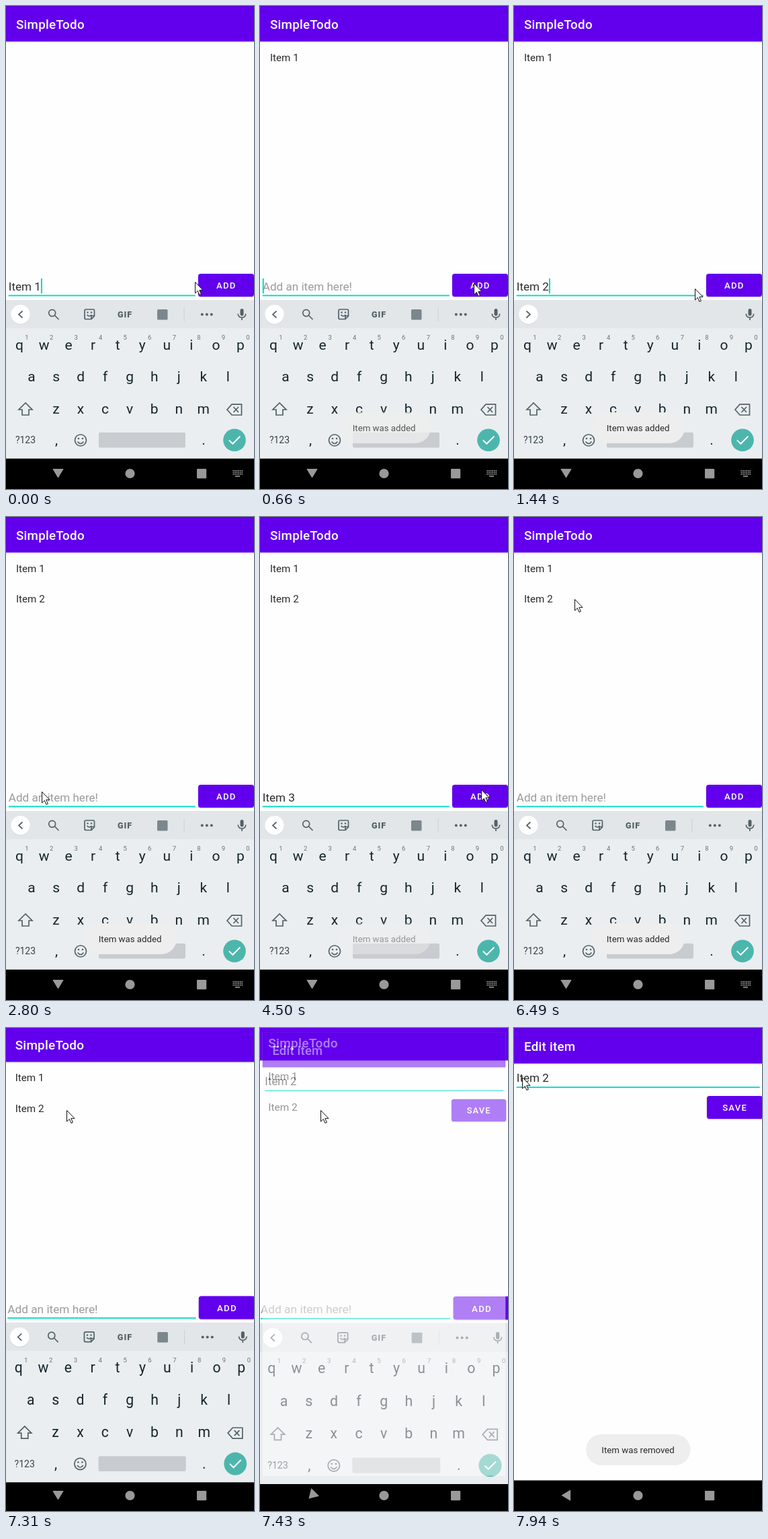
Recreate the animation shown at these times as an HTML page. Size 369x718 px, loop 8000 ms.

```html
<!DOCTYPE html>
<html lang="en">
<head>
<meta charset="utf-8">
<title>Todo list</title>
<style>
  html, body { margin: 0; width: 100%; height: 100%; overflow: hidden; background: #000; }
  svg { display: block; width: 369px; height: 718px; }
  text { font-family: Roboto, "Open Sans", sans-serif; white-space: pre; }
  .title { font-size: 18.8px; font-weight: 500; letter-spacing: .235px; fill: #fff; }
  .item { font-size: 15.15px; fill: #2a2a2a; }
  .field { font-size: 17.1px; fill: #2c2c2c; }
  .button { font-size: 13.15px; font-weight: 500; letter-spacing: 1.18px; fill: #fff; }
  .key { font-size: 21px; fill: #14252d; text-anchor: middle; }
  .digit { font-size: 9.5px; fill: #66737a; text-anchor: middle; }
  .toast { font-size: 13.25px; fill: #2a2a2a; text-anchor: middle; }
  .line { fill: none; stroke: #536168; stroke-width: 1.7; }
</style>
</head>
<body>
<svg id="stage" viewBox="0 0 369 718"></svg>
<script>
const LOOP = 8000;
const PURPLE = '#6200ee', TEAL = '#03dac5', ICON = '#536168', NAV = '#999';

const rect = (x, y, w, h, fill, r = 0) =>
  `<rect x="${x}" y="${y}" width="${w}" height="${h}" rx="${r}" fill="${fill}"/>`;
const label = (cls, x, y, str, extra = '') =>
  `<text class="${cls}" x="${x}" y="${y}" ${extra}>${str}</text>`;
const path = (d, extra = '') => `<path class="line" d="${d}" ${extra}/>`;
const dot = (x, y, r, fill = ICON) => `<circle cx="${x}" cy="${y}" r="${r}" fill="${fill}"/>`;
const ring = (x, y, r) => `<circle class="line" cx="${x}" cy="${y}" r="${r}"/>`;
const repeat = (n, make) => Array.from({ length: n }, (_, i) => make(i)).join('');

const page = title =>
  rect(0, 0, 369, 672.5, '#fefefe') +
  rect(0, 52, 369, 2, '#dedde0') + rect(0, 54, 369, 1, '#f3f3f4') +
  rect(0, 0, 369, 52.7, PURPLE) + rect(0, 0, 369, 1, '#5600d2') +
  label('title', 15, 34, title);

const button = (x, y, textX, str) =>
  rect(x - .5, y + .8, 84, 34.4, '#d6d0de', 4) + rect(x, y, 83, 34, PURPLE, 3.7) +
  label('button', textX, y + 22.2, str);

const keyRow = (letters, x, y, cls = 'key') =>
  repeat(letters.length, i => label(cls, x + i * 36.55, y, letters[i]));

const keyboard = () =>
  rect(0, 437, 369, 235.5, '#ebeef0') + rect(0, 437, 369, 42, '#e2e6e8') +
  dot(21.5, 459.3, 14.2, '#ccd1d4') + dot(21.5, 458.5, 14.2, '#fff') +
  path('M3 -5L-2.5 0L3 5', 'id="chevron"') +
  `<g id="tools">
    ${ring(68.7, 456.3, 5)}${path('M72.5 460L78.5 466')}
    ${path('M119 451H130Q131.5 451 131.5 453V461L127 465.5H119Q117 465.5 117 463.5V453Q117 451 119 451ZM131 460.5H127V465')}
    ${path('M120.5 459Q124 463 127.5 459')}${dot(121.5, 455.5, 1.2)}${dot(127, 455.5, 1.2)}
    ${label('', 166, 462.6, 'GIF', `fill="${ICON}" style="font-size:12.5px;font-weight:900;letter-spacing:1px"`)}
    ${rect(225, 451, 15.5, 15.5, '#7b878d', 1.5)}
    ${rect(264.5, 448, 1, 21, '#c9cfd2')}
    ${repeat(3, i => dot(291.8 + i * 7, 458.5, 2))}
  </g>` +
  rect(348.5, 450, 5, 10.5, ICON, 2.5) +
  path('M345.3 457.5Q345.5 463 351 463Q356.5 463 356.7 457.5M351 463V467') +
  keyRow('qwertyuiop', 20, 510.5) + keyRow('1234567890', 31, 495.5, 'digit') +
  keyRow('asdfghjkl', 38, 558) + keyRow('zxcvbnm', 74.5, 606) +
  path('M29 590L19 600H24V608H34V600H39Z') +
  path('M336 592.2H350.5V608H336L329 600ZM338.5 596L346 604M346 596L338.5 604') +
  label('key', 29, 650.3, '?123', 'style="font-size:14px;fill:#344249"') +
  label('key', 75, 652, ',') + label('key', 294, 652, '.') +
  ring(111, 645.5, 8.5) + path('M106.5 647.5Q111 653.5 115.5 647.5') +
  dot(108, 643, 1.3) + dot(114, 643, 1.3) +
  rect(138, 634, 129, 22.5, '#c8ccd0', 2) +
  dot(340, 645.3, 16.8, '#4db6ac') +
  path('M331.8 645.4L337.3 650.8L348.4 639.6', 'style="stroke:#fff;stroke-width:2"');

const navKeyboard = () =>
  `<g id="navKeys">${repeat(18, i =>
    rect(337.5 + i % 6 * 2.6, 690 + Math.floor(i / 6) * 2.6, 1.7, 1.6, NAV))}
    ${rect(341, 698.2, 7, 1.6, NAV)}</g>`;

const toast = (id, x, w, str) =>
  `<g id="${id}">${rect(x, 604, w, 46, '#eeeeee', 23)}${label('toast', 184.6, 632, str)}</g>`;

document.getElementById('stage').innerHTML = `
  ${rect(0, 0, 369, 718, '#000')}
  <g id="list">
    ${page('SimpleTodo')}
    ${repeat(3, i => label('item', 15, 81.5 + i * 45.3, `Item ${i + 1}`, `id="item${i}"`))}
    ${label('field', 3.76, 423, '', 'id="field"')}
    <rect id="caret" y="405" width="2" height="22.5" fill="${TEAL}"/>
    ${rect(3.7, 429.5, 278, 1.9, TEAL)}
    ${button(286, 398, 313, 'ADD')}
    <rect id="ripple" x="286" y="398" width="83" height="34" rx="3.7" fill="#fff"/>
    ${keyboard()}
  </g>
  <g id="edit">
    ${page('Edit item')}
    ${label('field', 3.76, 80.3, 'Item 2')}
    ${rect(3.7, 87.2, 362, 1.9, TEAL)}
    ${button(287, 101, 310.2, 'SAVE')}
  </g>
  <path id="back" d="M-7.5 -6.2H7.5L0 6.2Z" fill="${NAV}" stroke="${NAV}" stroke-linejoin="round"/>
  ${dot(184.5, 695, 7.1, NAV)}${rect(284, 688, 14.2, 14.2, NAV, 1)}
  ${navKeyboard()}
  ${toast('added', 116, 138, 'Item was added')}
  ${toast('removed', 107, 155.5, 'Item was removed')}
  <path id="cursor" d="M.5 .5V17L4.3 13.4L6.9 19.4L9.4 18.3L6.8 12.4H12Z" fill="#fff" stroke="#111"/>`;

const STEP = 130, FADE = 270, BLINK = 480;
const REMOVE = 6110, OPEN = 7185, OPENED = 7545;

// One round per item: typing starts, typing ends, ADD is pressed.
const rounds = [
  { type: -390, done: 0, add: 394 },
  { type: 1200, done: 1590, add: 2269 },
  { type: 3200, done: 3860, add: 4629 }
];

const home = { x: 281, y: 410 };
const moves = [
  { from: 0, to: 257, x: 318, y: 412 },
  { from: 806, to: 1075, x: 269, y: 420 },
  { from: 1870, to: 2136, x: 322, y: 410 },
  { from: 2402, to: 2790, x: 53, y: 408 },
  { from: 4230, to: 4490, x: 329, y: 405 },
  { from: 4629, to: 5160, x: 94, y: 189 },
  { from: 5180, to: 5310, x: 94, y: 165 },
  { from: REMOVE, to: 6370, x: 90, y: 122 },
  { from: 7430, to: 7930, x: 12, y: 73 }
];

const ramp = (t, from, to) => Math.min(1, Math.max(0, (t - from) / (to - from)));
function stepped(t, from, to) {
  const n = Math.round((to - from) / STEP);
  return Math.floor(ramp(t, from, to) * n + 1e-6) / n;
}
const shown = (t, from, to) => Math.min(ramp(t, from, from + FADE), 1 - ramp(t, to, to + FADE));

const el = id => document.getElementById(id);
const set = (id, name, value) => el(id).setAttribute(name, value);
const fade = (id, value) => set(id, 'opacity', Number(value));
const scaled = s => `translate(184.5 336) scale(${s}) translate(-184.5 -336)`;

function drawInput(t) {
  const n = rounds.findLastIndex(r => r.type <= t), { type, done, add } = rounds[n];
  const typing = t < done, filled = t < add;
  const count = 1 + Math.floor(9 * ramp(t, type, done));
  const field = el('field');
  field.textContent = filled ? `Item ${n + 1}`.slice(0, count) : 'Add an item here!';
  field.style.fill = filled ? '' : '#9b9b9b';

  const idle = t - (filled ? done : add);
  set('caret', 'x', 3.76 + (filled ? field.getComputedTextLength() : 0));
  fade('caret', typing || idle % (2 * BLINK) < BLINK);
  fade('tools', !typing);
  set('chevron', 'transform', `translate(21.5 458.5) scale(${typing ? -1 : 1} 1)`);
  fade('ripple', filled ? 0 : .2 * (1 - ramp(t, add, add + FADE)));
}

function drawCursor(t) {
  let { x, y } = home;
  for (const m of moves) {
    const p = stepped(t, m.from, m.to);
    x += (m.x - x) * p;
    y += (m.y - y) * p;
  }
  set('cursor', 'transform', `translate(${x} ${y})`);
}

function drawOpening(t) {
  const p = stepped(t, OPEN, OPENED), reveal = Math.max(0, (3 * p - 1) / 2);
  fade('list', p < 1);
  fade('navKeys', p === 0);
  fade('edit', reveal);
  set('list', 'transform', scaled(1 + .024 * p));
  set('edit', 'transform', scaled(.94 + .06 * p));
  set('back', 'transform', `translate(77.5 694.7) rotate(${90 * reveal})`);
}

function draw(t) {
  rounds.forEach((r, i) => fade('item' + i, t >= r.add && !(i === 2 && t >= REMOVE)));
  fade('added', Math.max(shown(t, 450, 4352), shown(t, 4640, 6500)));
  fade('removed', shown(t, 7500, LOOP));
  drawInput(t);
  drawCursor(t);
  drawOpening(t);
}

const start = performance.now();
function tick() {
  draw((performance.now() - start) % LOOP);
  requestAnimationFrame(tick);
}
tick();
</script>
</body>
</html>
```
